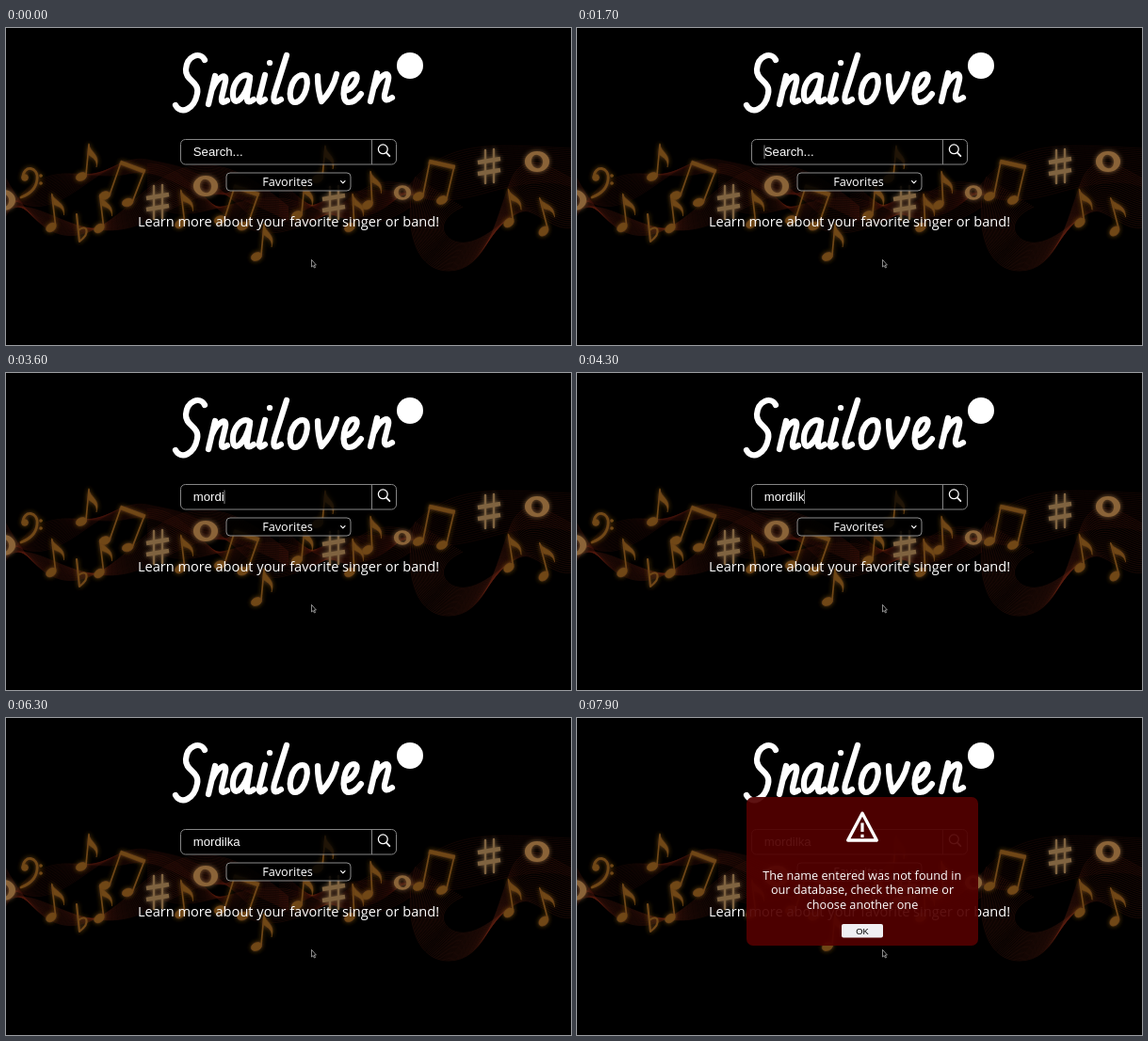
Animation of 600x337 px, one loop 8 s. Source, as an HTML page:

```html
<!DOCTYPE html>
<html lang="en">
<head>
<meta charset="utf-8">
<title>Snailoven</title>
<style>
  html, body { margin: 0; width: 100%; height: 100%; overflow: hidden; background: #000; }
  svg { display: block; width: 100vw; height: 100vh; }
  .ui { font-family: "Open Sans", "Noto Sans", sans-serif; fill: #fff; text-anchor: middle; }
  .form { font-family: "Liberation Sans", Arial, sans-serif; }
  .line { fill: none; stroke: #fff; stroke-linecap: round; stroke-linejoin: round; }
</style>
</head>
<body>
<svg viewBox="0 0 600 337" preserveAspectRatio="none">
  <defs>
    <filter id="glow" x="-10%" y="-30%" width="120%" height="160%">
      <feGaussianBlur stdDeviation="2.4" result="halo"/>
      <feMerge><feMergeNode in="halo"/><feMergeNode in="SourceGraphic"/></feMerge>
    </filter>
  </defs>
  <rect width="600" height="337"/>
  <g id="waves" fill="none" stroke-width=".7"></g>
  <g id="notes" filter="url(#glow)" stroke-linecap="round" stroke-linejoin="round"></g>

  <g class="line" stroke-width="6.2" role="img" aria-label="Snailoven">
    <path d="M211 34C206 24 192 30 191 44C190 56 206 57 203 70C200 86 186 93 180 82"/>
    <path d="M222 51L215 81M219 65C224 53 235 46 233 57L229 74Q228 82 235 77"/>
    <path d="M259 52C250 45 240 60 241 72C242 85 254 75 259 54L256 73Q255 82 263 76"/>
    <path d="M275 50L269 74Q268 82 275 76M280 37l.1 0"/>
    <path d="M298 29L285 70Q282 83 292 76"/>
    <path d="M315 50C302 50 297 79 307 79C318 79 325 50 315 50Z"/>
    <path d="M331 51Q331 66 335 78Q347 66 351 49"/>
    <path d="M360 67C371 64 377 49 369 49C359 49 354 79 364 79Q371 79 377 70"/>
    <path d="M394 48L387 78M391 63C397 50 408 44 406 55L402 71Q401 80 410 74"/>
  </g>
  <circle cx="429" cy="40" r="14" fill="#fff"/>

  <rect x="185.5" y="118.5" width="229" height="26.5" rx="5" stroke="#858585" fill-opacity=".7"/>
  <path d="M388.5 118.5V145" stroke="#858585"/>
  <g class="line" stroke-width="1.3"><circle cx="400.3" cy="128.8" r="4.9"/><path d="M404 132.6L407.4 136.2" stroke-width="1.7"/></g>
  <text id="query" class="form" x="198.8" y="135.8" font-size="13.2" fill="#fff"></text>
  <rect id="caret" y="124.5" width="0.8" height="14.5" fill="#aaa"/>

  <rect x="234" y="154" width="132" height="19" rx="4" stroke="#8c8c8c" fill-opacity=".85"/>
  <text class="ui" x="299" y="168" font-size="12.7">Favorites</text>
  <path class="line" d="M355.6 162.6l2.2 2.2l2.2-2.2" stroke-width="1.2"/>
  <text class="ui" x="300" y="210.5" font-size="14.6">Learn more about your favorite singer or band!</text>

  <g id="alert">
    <rect x="180" y="84" width="246" height="158" rx="7" fill="#520000" fill-opacity=".93"/>
    <path class="line" d="M303 101.3L318.3 130H287.7Z" stroke-width="3.4"/>
    <path d="M303 111.5V121M303 123.7V127" stroke="#fff" stroke-width="3.2"/>
    <g class="ui" font-size="12.7">
      <text x="302.7" y="172">The name entered was not found in</text>
      <text x="303" y="187.3">our database, check the name or</text>
      <text x="303" y="202.8">choose another one</text>
    </g>
    <rect x="281" y="219" width="44" height="14.5" rx="2" fill="#efeff2"/>
    <text class="form" x="303" y="229.6" font-size="9.3" text-anchor="middle">OK</text>
  </g>
  <path d="M324.5 246.3V254L326.2 252.5L327.4 255L328.5 254.5L327.3 252H329.4Z" stroke="#c4c4c4" stroke-width=".7"/>
</svg>
<script>
const LOOP = 8000;
const WORD = "mordilka";
const KEY_TIMES = [2500, 2700, 3000, 3300, 3600, 3800, 4100, 4500];
const BLINK = 600;
const FIRST_BLINK = 400;
const ALERT_AT = 6700;
const byId = id => document.getElementById(id);

// Fine threads blended between two edge curves of the same shape.
function weave(from, to, count, color, opacity) {
  const numbers = /-?\d+(\.\d+)?/g;
  const ends = to.match(numbers).map(Number);
  let out = "";
  for (let k = 0; k < count; k++) {
    let i = 0;
    const mix = k / (count - 1);
    const d = from.replace(numbers, n => (+n + (ends[i++] - n) * mix).toFixed(1));
    out += `<path d="${d}" stroke="${color}" opacity="${opacity}"/>`;
  }
  return out;
}

byId("waves").innerHTML =
  weave("M0 160C50 250 90 225 140 180S230 130 300 190",
        "M0 196C30 170 80 240 150 205S220 165 300 205", 22, "#571c11", .36) +
  weave("M0 200C40 130 80 165 130 155S200 200 260 165",
        "M0 175C50 225 100 130 150 140S205 150 260 200", 20, "#4a180e", .34) +
  weave("M150 145C200 140 230 235 300 215S375 150 430 168",
        "M150 180C190 225 250 165 310 185S385 220 430 190", 22, "#501a10", .34) +
  weave("M290 160C340 215 390 215 430 165S530 125 600 128",
        "M290 210C350 170 390 165 440 180S545 150 600 168", 22, "#4c180e", .34) +
  weave("M435 158C422 200 430 258 470 258S520 205 535 165S580 150 600 160",
        "M485 190C450 205 465 232 490 228S540 190 555 195S585 215 600 212", 26, "#5e2014", .4);

const stem = (x1, y1, x2, y2) => `<path d="M${x1} ${y1}L${x2} ${y2}" stroke-width="1.7"/>`;
const head = (x, y) => `<ellipse cx="${x}" cy="${y}" rx="6" ry="4.2" transform="rotate(-25 ${x} ${y})"/>`;
const glyphs = {
  eighth: head(0, 0) + stem(5, -2, 8, -34) +
    `<path d="M8 -35C9 -25 21 -24 16 -10C17 -18 12 -20 8 -23Z"/>`,
  beam: head(0, 0) + head(25, 4) + stem(5, -2, 12, -37) + stem(30, 2, 38, -32) +
    `<path d="M12 -39L39 -33L38 -29L11 -35Z"/>`,
  whole: `<path fill-rule="evenodd" stroke="none" d="M-13 0A13 11 0 1 0 13 0A13 11 0 1 0 -13 0ZM-6 -2C-4 -12 8 -6 6 2C4 12 -8 6 -6 -2Z"/>`,
  sharp: `<path fill="none" stroke-width="2.4" d="M-4 -17V18M5 -18V17"/>
    <path fill="none" stroke-width="4.4" stroke-linecap="butt" d="M-12 -4L12 -8M-12 8L12 4"/>`,
  flat: `<path fill="none" stroke-width="2.2" d="M-4 -15L-1 14C12 4 6 -5 -2 2"/>`,
  bass: `<path fill="none" stroke-width="2.8" d="M-8 -5C-8 -19 9 -17 7 -3C6 7 -2 13 -10 16"/>
    <circle cx="-6" cy="-5" r="3.5"/><circle cx="11" cy="-7" r="1.6"/><circle cx="11" cy="1" r="1.6"/>`
};
const tones = { whole: "#8a6438", sharp: "#7f6340" };

byId("notes").innerHTML = [
  ["whole", -3, 183], ["bass", 26, 164], ["eighth", 48, 212, -12], ["eighth", 80, 158],
  ["flat", 79, 213], ["eighth", 99, 213, -12], ["beam", 105, 178, 8], ["sharp", 161, 185],
  ["eighth", 185, 208, -12], ["whole", 212, 168], ["beam", 227, 204, 6], ["eighth", 266, 243],
  ["eighth", 309, 199], ["eighth", 331, 160], ["sharp", 348, 186], ["eighth", 365, 212, -8],
  ["eighth", 384, 188, -8], ["whole", 421, 175, 0, .7], ["beam", 438, 179], ["sharp", 513, 147],
  ["whole", 564, 142], ["eighth", 534, 207, -14], ["eighth", 571, 216, -20]
].map(([kind, x, y, turn = 0, size = 1]) => {
  const tone = tones[kind] || "#6f4616";
  return `<g transform="translate(${x} ${y}) rotate(${turn}) scale(${size})" fill="${tone}" stroke="${tone}" stroke-width=".5">${glyphs[kind]}</g>`;
}).join("");

const query = byId("query"), caret = byId("caret"), alertBox = byId("alert");

function draw(t) {
  const typed = KEY_TIMES.filter(at => t >= at).length;
  const text = typed ? WORD.slice(0, typed) : "Search...";
  if (query.textContent !== text) query.textContent = text;

  const since = typed ? t - KEY_TIMES[typed - 1] : t - FIRST_BLINK;
  const lit = since >= 0 && Math.floor(since / BLINK) % 2 === 0;
  const alerting = t >= ALERT_AT;
  caret.setAttribute("x", 198.6 + (typed ? query.getComputedTextLength() : 0));
  caret.style.display = lit && !alerting ? "" : "none";
  alertBox.style.display = alerting ? "" : "none";
}

const start = performance.now();
function frame() {
  draw((performance.now() - start) % LOOP);
  requestAnimationFrame(frame);
}
frame();
</script>
</body>
</html>
```
